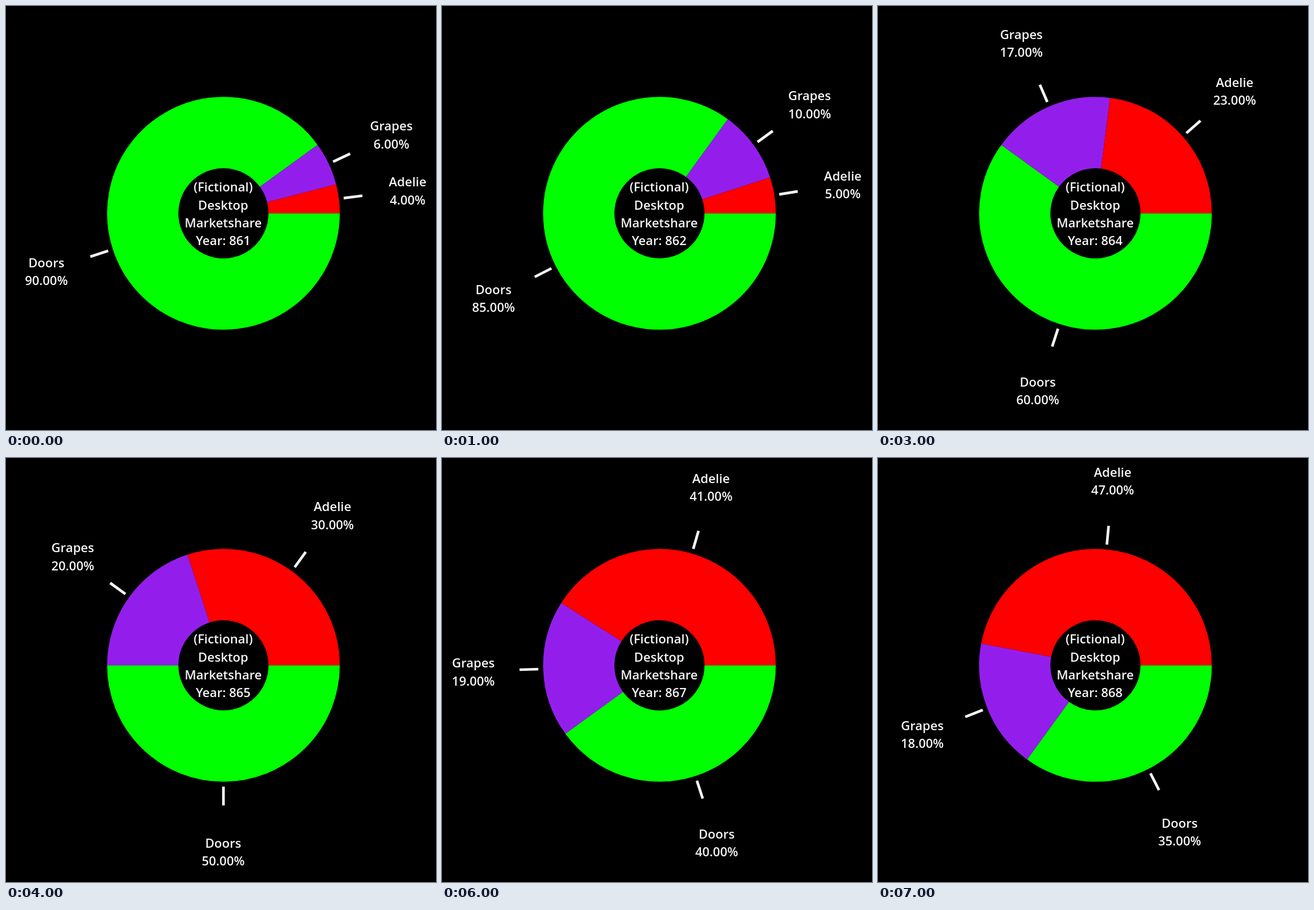
An HTML page for the animation above (8 s loop, 754x743 px).

```html
<!DOCTYPE html>
<html lang="en">
<head>
<meta charset="utf-8">
<title>Desktop marketshare</title>
<style>
  html, body { margin: 0; width: 100%; height: 100%; overflow: hidden; background: #000; }
  svg { display: block; width: 754px; height: 743px; }
  text { font: 600 22px "Open Sans", "Noto Sans", sans-serif; fill: #f4f4f4; text-anchor: middle; }
  .slice { fill: none; stroke-width: 125; }
  .tick { stroke: #f4f4f4; stroke-width: 4.7; }
</style>
</head>
<body>
<svg id="chart" viewBox="0 0 754 743"></svg>
<script>
const CX = 381.3, CY = 363.3, LINE = 31.3;
const RING = 141.5, TICK_IN = 212.5, TICK_OUT = 245.5, LABEL = 326;
const FIRST_YEAR = 861, STEP = 1000;

// Clockwise from three o'clock; one share per year.
const series = [
  { name: "Doors", color: "#00ff00", share: [90, 85, 79, 60, 50, 46, 40, 35] },
  { name: "Grapes", color: "#931eec", share: [6, 10, 14, 17, 20, 22, 19, 18] },
  { name: "Adelie", color: "#ff0000", share: [4, 5, 7, 23, 30, 32, 41, 47] }
];
const years = series[0].share.length;
const chart = document.getElementById("chart");

function add(tag, attrs, content = "") {
  const el = document.createElementNS("http://www.w3.org/2000/svg", tag);
  set(el, attrs);
  el.textContent = content;
  return chart.appendChild(el);
}

function set(el, attrs) {
  for (const key in attrs) el.setAttribute(key, attrs[key]);
}

function polar(radius, percent) {
  const a = percent / 50 * Math.PI;
  return [CX + radius * Math.cos(a), CY + radius * Math.sin(a)];
}

for (const s of series) {
  s.slice = add("path", { class: "slice", stroke: s.color });
  s.tick = add("line", { class: "tick" });
  s.title = add("text", {}, s.name);
  s.value = add("text", {});
}

const title = ["(Fictional)", "Desktop", "Marketshare", ""].map((line, i) =>
  add("text", { x: CX - 0.5, y: 325.2 + i * LINE }, line));

function draw(index) {
  let start = 0;
  for (const s of series) {
    const share = s.share[index], end = start + share, mid = start + share / 2;
    const [x1, y1] = polar(TICK_IN, mid), [x2, y2] = polar(TICK_OUT, mid);
    const [x, y] = polar(LABEL, mid);
    const large = share > 50 ? 1 : 0;
    set(s.slice, { d: `M${polar(RING, start)}A${RING} ${RING} 0 ${large} 1 ${polar(RING, end)}` });
    set(s.tick, { x1, y1, x2, y2 });
    set(s.title, { x: x - 0.5, y: y - 6.2 });
    set(s.value, { x: x - 0.5, y: y - 6.2 + LINE });
    s.value.textContent = share.toFixed(2) + "%";
    start = end;
  }
  title[3].textContent = "Year: " + (FIRST_YEAR + index);
}

let shown = -1;
const begin = performance.now();

function tick() {
  const index = Math.floor((performance.now() - begin) / STEP) % years;
  if (index !== shown) draw(shown = index);
  requestAnimationFrame(tick);
}
tick();
</script>
</body>
</html>
```
